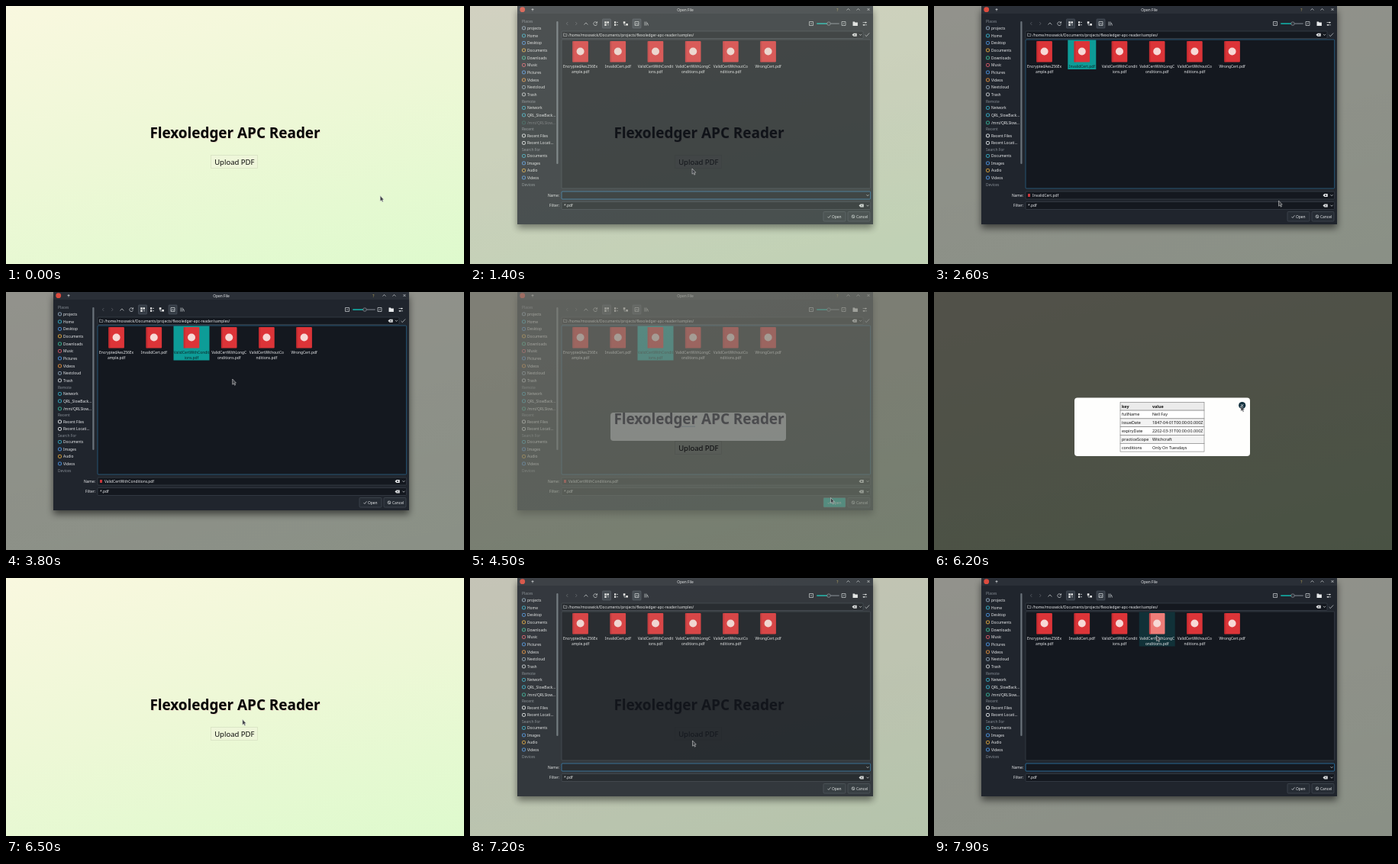
Recreate the animation shown at these times as an HTML page. Size 600 by 338 pixels, loop 8000 ms.

```html
<!DOCTYPE html>
<html lang="en">
<head>
<meta charset="utf-8">
<title>APC Reader</title>
<style>
  html, body { margin: 0; width: 100%; height: 100%; overflow: hidden; background: #eef8d8; }
  svg { display: block; width: 100vw; height: 100vh; }
  text { font-family: "Noto Sans", "Open Sans", sans-serif; white-space: pre; }
  .ui text { font-size: 4.9px; fill: #e8eaec; }
  .ui .dim { fill: #858c94; }
  .line { fill: none; stroke: #d5d9dc; stroke-width: .7; }
  .table text { font-size: 5.4px; fill: #111; }
</style>
</head>
<body>
<svg id="stage" viewBox="0 0 600 338" preserveAspectRatio="none">
  <defs>
    <linearGradient id="paper" gradientUnits="userSpaceOnUse" x1="0" y1="0" x2="120" y2="464">
      <stop offset="0" stop-color="#f9f8df"/>
      <stop offset=".5" stop-color="#edf8d6"/>
      <stop offset="1" stop-color="#defacd"/>
    </linearGradient>
    <filter id="blur" x="-10%" y="-10%" width="120%" height="120%"><feGaussianBlur stdDeviation="5"/></filter>
  </defs>
  <g id="browser">
    <rect width="600" height="338" fill="url(#paper)"/>
    <g text-anchor="middle">
      <text x="300.8" y="173.8" font-size="18.9" font-weight="600" fill="#d9b9b0" opacity=".6">Flexoledger APC Reader</text>
      <text x="300" y="173" font-size="18.9" font-weight="600" fill="#050505">Flexoledger APC Reader</text>
      <rect x="268.5" y="195.5" width="61" height="17" fill="#eef6d9" stroke="#d8e3c2" stroke-width=".8"/>
      <text x="299.3" y="207.5" font-size="9.5" font-weight="500" fill="#080808">Upload PDF</text>
    </g>
    <g id="modal">
      <rect width="600" height="338" fill="#000" opacity=".67"/>
      <g id="loading">
        <rect x="184" y="158" width="230" height="37" rx="4" fill="#fff"/>
        <rect x="277" y="175.7" width="18" height=".8" fill="#4c80c8" opacity=".7"/>
      </g>
      <g id="result" class="table"></g>
    </g>
  </g>
  <g id="dialog" class="ui"></g>
  <path id="cursor" d="M0 0V7.2L1.7 5.8L2.8 8.2L4 7.6L2.9 5.3L4.8 5.1Z" fill="#3d4045" stroke="#e4e4e4" stroke-width=".5"/>
</svg>
<script>
const $ = id => document.getElementById(id);
const LOOP = 8000, STEP = 100;

const rect = (x, y, w, h, fill, more = '') =>
  `<rect x="${x}" y="${y}" width="${w}" height="${h}" fill="${fill}" ${more}/>`;
const text = (x, y, s, more = '') => `<text x="${x}" y="${y}" ${more}>${s}</text>`;
const line = (d, more = '') => `<path class="line" d="${d}" ${more}/>`;
const dot = (x, y, r, fill) => `<circle cx="${x}" cy="${y}" r="${r}" fill="${fill}"/>`;
const chevron = (x, y) => line(`M${x - 1.5} ${y - .8}l1.5 1.6l1.5 -1.6`);
const eraser = (x, y) => `<path d="M${x} ${y}l2 -2h4.2v4h-4.2z" fill="#e8eaec"/>` +
  line(`M${x + 2.5} ${y - 1}l2 2m0 -2l-2 2`, 'style="stroke:#20252c"');

// Result table
const rows = [
  ['key', 'value'],
  ['fullName', 'Nell Fay'],
  ['issueDate', '1847-04-01T00:00:00.000Z'],
  ['expiryDate', '2202-03-31T00:00:00.000Z'],
  ['practiceScope', 'Witchcraft'],
  ['conditions', 'Only On Tuesdays']
];
const rowH = 10.8;
$('result').innerHTML =
  rect(184, 138.5, 230, 76.5, '#fefefd', 'rx="4"') +
  rows.map(([key, value], i) => {
    const y = 144.3 + i * rowH, weight = i ? '' : 'font-weight="700"';
    const fill = i === 0 ? '#ebebeb' : i % 2 ? '#fff' : '#f3f3f3';
    return rect(244, y, 110, rowH, fill, 'stroke="#777" stroke-width=".6"') +
      text(246, y + 7.3, key, weight) + text(286, y + 7.3, value, weight);
  }).join('') +
  dot(403.7, 148.6, 4.6, '#12303e') +
  line('M402 146.9l3.4 3.4m0 -3.4l-3.4 3.4', 'style="stroke:#fff"');

// File dialog
const files = [
  ['EncryptedAes256Ex', 'ample.pdf'],
  ['InvalidCert.pdf'],
  ['ValidCertWithCondit', 'ions.pdf'],
  ['ValidCertWithLongC', 'onditions.pdf'],
  ['ValidCertWithoutCo', 'nditions.pdf'],
  ['WrongCert.pdf']
];
const fileX = i => 144.6 + i * 49.2;

// Each place: label, baseline centre, icon colour (none for a heading)
const places = [
  ['Places', 20.5], ['projects', 29, '#8aa0b4'], ['Home', 39, '#36a8c0'], ['Desktop', 48.5, '#4b8fd8'],
  ['Documents', 58, '#d8a23c'], ['Downloads', 68, '#3bb08f'], ['Music', 77.5, '#d85a6a'],
  ['Pictures', 87, '#4b8fd8'], ['Videos', 97, '#d88a3c'], ['Nextcloud', 106.5, '#8aa0b4'],
  ['Trash', 116, '#c0c5ca'], ['Remote', 125], ['Network', 133.5, '#36a8c0'],
  ['QRL_SlowBack...', 143, '#36a8c0'], ['/mnt/QRLSlow...', 153, '#36a890'], ['Recent', 161.5],
  ['Recent Files', 170, '#dfe3e6'], ['Recent Locati...', 179.5, '#dfe3e6'], ['Search For', 188],
  ['Documents', 196.5, '#36a8c0'], ['Images', 206, '#4b8fd8'], ['Audio', 215.5, '#d8a23c'],
  ['Videos', 225, '#4b8fd8'], ['Devices', 234]
];

function titleBar() {
  return rect(62, 0, 466, 10, '#2a2f37') + text(282, 6.8, 'Open File', 'text-anchor="middle"') +
    dot(68.7, 4.7, 3.4, '#dd4b3e') +
    line('M80.5 4.5h3m-1.5 -1.5v3.5') +
    text(480.3, 6.5, '?', 'style="fill:#c8b25a"') +
    line('M493.5 5.5l2 -2l2 2M506.5 5.5l2 -2l2 2M520.5 3l3 3m0 -3l-3 3');
}

function toolbar() {
  return line('M128.3 21l-2 2l2 2M138.2 21l2 2l-2 2', 'opacity=".35"') +
    line('M149.5 24.5l2.4 -2.6l2.4 2.6') +
    line('M166.3 22a2.4 2.4 0 1 0 .2 1.8M166.6 20.3v2h-2') +
    [179, 218.5].map(x => rect(x - 5.5, 17, 11, 12, '#343b44', 'rx="1" stroke="#5b636c" stroke-width=".5"')).join('') +
    rect(176.3, 20.3, 2.4, 2.4, '#eee') + rect(179.5, 20.3, 2.4, 2.4, '#eee') +
    rect(176.3, 23.5, 2.4, 2.4, '#eee') + line('M180 24.7h2') +
    rect(189, 20.3, 2.2, 2.2, '#eee') + rect(189, 23.6, 2.2, 2.2, '#eee') + line('M192 21.4h2M192 24.7h2') +
    rect(200.8, 20.3, 2.6, 2.6, '#eee') + rect(204.3, 23, 2.6, 2.6, '#eee') + line('M202 23v2h2') +
    line('M216 20.5h5v5h-5zM216 24.6l2 -1.8l1.5 1l1.5 -1') +
    line('M229 20.5v5.2M231 20.5v5.2M232.3 22l1.2 3.5') +
    line('M444.5 20.5h5v5h-5zM446 23h2M487 20.5h5v5h-5zM488.5 24l2 -2') +
    rect(454, 22.3, 16, 1.6, '#13a39c', 'rx=".8"') + rect(470, 22.3, 14, 1.6, '#596069', 'rx=".8"') +
    `<circle cx="470" cy="23.1" r="2.3" fill="#2a2f37" stroke="#9aa2a8" stroke-width=".6"/>` +
    `<path d="M501.5 20.5h2.3l.8 1h3.3v4.4h-6.4z" fill="#e8eaec"/>` +
    line('M514.5 21.6h5.5M514.5 24.8h5.5') + dot(518.3, 21.6, .9, '#eee') + dot(516, 24.8, .9, '#eee');
}

function sidebar() {
  return places.map(([label, y, color], i) => color
    ? `<g id="place${i}">` + rect(68.6, y - 2, 3.8, 3.8, 'none', `rx=".8" stroke="${color}" stroke-width="1"`) +
      text(75, y + 1.8, label) + '</g>'
    : text(68, y + 1.8, label, 'class="dim"')).join('') +
    rect(113.3, 20, 2.2, 187, '#6a737b', 'rx="1.1"');
}

function fileCell(lines, i) {
  const x = fileX(i), w = lines.length > 1 ? 47 : 37;
  return rect(x - w / 2, 44.5, w, lines.length > 1 ? 45 : 38.5, 'none', `id="cell${i}"`) +
    rect(x - 10.3, 46, 20.6, 27.5, '#dc3438', `rx="1" id="icon${i}"`) +
    rect(x - 10.3, 46, 2, 27.5, '#b8272d', 'opacity=".6"') +
    dot(x, 59.5, 5, '#f7d9d6') +
    `<g id="label${i}" text-anchor="middle">` +
    lines.map((s, n) => text(x, 81 + n * 6.7, s)).join('') + '</g>';
}

const field = (x, y, w, h, id = '') =>
  rect(x, y, w, h, '#14181f', `rx="1" stroke="#3b434c" stroke-width=".7" ${id}`);
const button = (x, id, label) =>
  rect(x, 269.5, 29, 12.5, '#262c34', `rx="1.2" stroke="#4a525b" stroke-width=".6" id="${id}"`) +
  text(x + 11, 277.6, label);

$('dialog').innerHTML =
  rect(62, 6, 466, 285, '#000', 'opacity=".55" filter="url(#blur)"') +
  rect(62, 0, 466, 286, '#20252d') +
  titleBar() + toolbar() + sidebar() +
  field(120, 33, 395, 9.5) + line('M122.5 36h1.6l.6 .7h2.3v2.8h-4.5z', 'opacity=".7"') +
  text(129, 39.5, '/home/mosswick/Documents/projects/flexoledger-apc-reader/samples/') +
  eraser(500.5, 37.7) + chevron(511.5, 37.7) + line('M517.6 38l1.7 1.7l3.8 -4.2') +
  field(120, 44, 404.6, 195, 'id="view"') +
  files.map(fileCell).join('') +
  text(117, 249.8, 'Name:', 'text-anchor="end"') + field(120, 243, 404.6, 10, 'id="name"') +
  `<g id="picked">${rect(123, 246, 3, 4, '#c9353a')}${text(129, 249.8, '', 'id="pickedName"')}${eraser(509.5, 248)}</g>` +
  chevron(521, 248) +
  text(117, 263.3, 'Filter:', 'text-anchor="end"') + field(120, 256.5, 404.6, 10) +
  text(123, 263.3, '*.pdf') + eraser(509.5, 261.5) + chevron(521, 261.5) +
  button(463, 'open', 'Open') + line('M468.5 276l1.4 1.5l2.6 -3.2') +
  button(495, 'cancel', 'Cancel') +
  `<circle class="line" cx="502" cy="275.8" r="1.9"/>` + line('M500.7 274.5l2.6 2.6');

// Motion: rows of time followed by values
const cursorPath = [
  [0, 490.2, 248.6], [100, 470, 245], [200, 400, 215], [300, 310, 180], [400, 225, 163], [500, 207, 172],
  [600, 235, 195], [700, 270, 207], [800, 291, 213], [2000, 291, 213], [2300, 195, 70], [2400, 195, 65],
  [2600, 451.5, 255], [2800, 455, 254], [2900, 450, 240], [3300, 300, 110], [3500, 245, 66],
  [3700, 245, 66], [4000, 400, 210], [4300, 472.5, 269.5], [5400, 472.5, 269.5], [5700, 450, 220],
  [6000, 408, 156], [6200, 402, 149], [6300, 400, 151], [6500, 309.8, 185.3], [6700, 295, 208],
  [6800, 291.5, 213], [7300, 291.5, 213], [7700, 292, 110], [7900, 291.5, 75.5]
];
const dialogFade = [
  [1200, 0], [1300, .4], [1400, .75], [1600, 1], [4300, 1], [4500, .33], [4700, 0],
  [6900, 0], [7000, .4], [7100, .75], [7300, 1]
];
const dimming = [
  [1200, 0], [1400, .38], [1900, 1], [4300, 1], [4500, .55], [4900, 0], [6900, 0], [7100, .38], [7600, 1]
];
const modalFade = [[4300, 0], [4500, .5], [4800, 1], [6200, 1], [6400, 0]];

function at(table, t) {
  if (t <= table[0][0]) return table[0].slice(1);
  const i = table.findIndex(row => row[0] > t);
  if (i < 0) return table[table.length - 1].slice(1);
  const a = table[i - 1], b = table[i], k = (t - a[0]) / (b[0] - a[0]);
  return a.slice(1).map((v, n) => v + (b[n + 1] - v) * k);
}

const set = (id, name, value) => $(id).setAttribute(name, value);
const show = (id, opacity) => {
  $(id).style.opacity = opacity;
  $(id).style.display = opacity > 0 ? '' : 'none';
};

function render(t) {
  const [x, y] = at(cursorPath, t), [dim] = at(dimming, t);
  set('cursor', 'transform', `translate(${x} ${y})`);
  $('browser').style.filter = dim ? `brightness(${1 - .41 * dim}) saturate(${1 - .6 * dim})` : 'none';
  show('dialog', at(dialogFade, t)[0]);
  show('modal', at(modalFade, t)[0]);
  show('loading', t < 4900 ? 1 : 0);
  show('result', t < 4900 ? 0 : 1);

  const picked = t < 2400 || t > 5000 ? -1 : t < 3600 ? 1 : 2;
  files.forEach((lines, i) => {
    const over = Math.abs(x - fileX(i)) < 23 && y > 45 && y < 89;
    set('cell' + i, 'fill', i === picked ? '#0d9c97' : over ? '#113138' : 'none');
    set('icon' + i, 'fill', over && i !== picked ? '#ee7d78' : '#dc3438');
    for (const s of $('label' + i).children) s.style.fill = i === picked ? '#0d2528' : '';
  });
  $('pickedName').textContent = picked < 0 ? '' : files[picked].join('');
  show('picked', picked < 0 ? 0 : 1);
  set('name', 'stroke', picked < 0 ? '#2e86c0' : '#3b434c');
  set('view', 'stroke', picked < 0 ? '#3b434c' : '#2b6a94');
  set('open', 'fill', t >= 4200 && t < 4800 ? '#12a89c' : '#262c34');
  show('place14', t < 2000 ? .35 : 1);
}

const start = performance.now();
function tick() {
  const t = (performance.now() - start) % LOOP;
  render(Math.floor(t / STEP) * STEP);
  requestAnimationFrame(tick);
}
tick();
</script>
</body>
</html>
```
